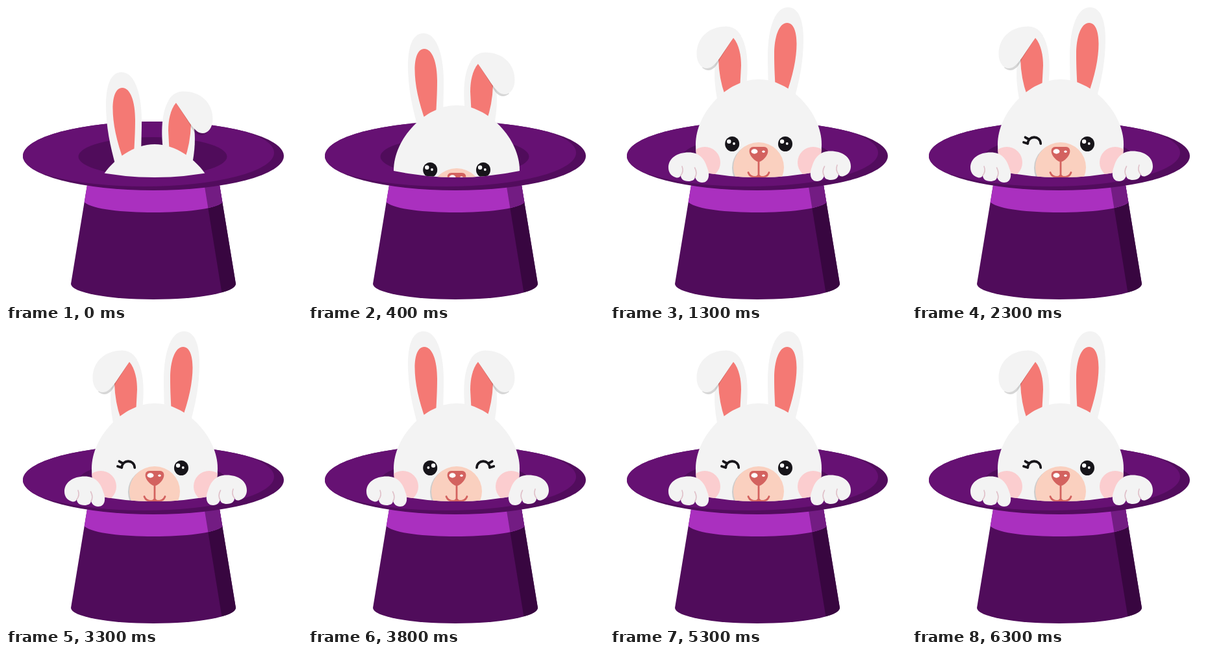
An HTML page for the animation above (6.8 s loop, 456 by 456 pixels).

```html
<!DOCTYPE html>
<html lang="en">
<head>
<meta charset="utf-8">
<title>Rabbit in a hat</title>
<style>
  html, body { margin: 0; width: 100%; height: 100%; overflow: hidden; background: #fff; }
  svg { display: block; width: 100vw; height: 100vh; }
  .fur { fill: #f3f3f3; }
  .inner { fill: #f47974; }
  .shade { fill: #000; fill-opacity: .16; }
  .line { fill: none; stroke-linecap: round; stroke-linejoin: round; }
</style>
</head>
<body>
<svg viewBox="0 0 456 456">
  <defs>
    <clipPath id="body"><path d="M126 270 L100 428 A127 24 0 0 0 354 428 L328 270Z"/></clipPath>
    <clipPath id="brim"><ellipse cx="227" cy="231" rx="201" ry="53"/></clipPath>
    <clipPath id="opening"><path d="M0 0 H456 V254 H326 Q229 274 132 254 H0Z"/></clipPath>
    <path id="skull" d="M132 213 C132 165 180 113 229 113 C278 113 326 165 326 213 C326 240 318 262 308 280 H150 C140 262 132 240 132 213Z"/>
    <clipPath id="face"><use href="#skull"/></clipPath>
    <g id="eye">
      <ellipse cx="188.2" cy="212.5" rx="11" ry="11.5" fill="#17151a"/>
      <circle cx="183.3" cy="208.8" r="3.2" fill="#fff"/>
      <circle cx="191" cy="212" r="1.9" fill="#fff"/>
    </g>
    <g id="paw">
      <path class="fur" d="M90 249 C90 234 104 225.500 121 225.500 C138 225.500 146 236 150 250 C154.500 261 152 272 142 272 C136 272 132 268 131 263 C131 268 126 270 121 270 C113 270 109 266 109 261 C107 265 104 265 101 264 C94 262 90 256 90 249Z"/>
      <path class="line" stroke="#dfbfc8" stroke-width="1.6" d="M111 247 Q114 255 109 261 M130.500 249 Q135 257 131 264"/>
    </g>
  </defs>

  <g clip-path="url(#body)">
    <path fill="#500c5b" d="M90 260 H370 V456 H90Z"/>
    <path fill="#380640" d="M303 260 L333 445 L334 456 H370 V260Z"/>
    <path id="band" fill="#aa30bf" d="M110 260 H345 V303 H333 C310 323 145 323 121.700 303 H110Z"/>
    <path fill="#731c83" d="M303 260 L311.300 311 Q326 308 333 303 H345 V260Z"/>
  </g>
  <g clip-path="url(#brim)">
    <path fill="#520c5d" d="M20 170 H436 V290 H20Z"/>
    <ellipse cx="213" cy="226" rx="200" ry="52" fill="#661173"/>
  </g>
  <ellipse cx="226" cy="232" rx="114.500" ry="30" fill="#500c5b"/>

  <g clip-path="url(#opening)">
    <g id="rabbit">
      <g id="ears">
        <path class="fur" d="M170 150 C160 115 154 85 154 52 C154 25 160 2 178 2 C200 2 210 40 209 85 L208 130Z"/>
        <path class="inner" d="M182 140 C170 108 164.500 80 164.500 58 C164.500 40 169 26 179 26 C192 26 199 48 199 75 C199 95 198 110 197 130Z"/>
        <path class="fur" d="M243 130 C238 95 239 58 254 41 L289 82 Q294 110 286 148Z"/>
        <path class="inner" d="M262 49 C253 60 250 76 250 92 L252 130 L275 137 Q284 112 285 82Z"/>
        <path class="shade" d="M262 49 L283 82 C289 97 299 104 310 95 L290 70Z"/>
        <path class="fur" d="M250 46 C256 35 265 31.500 273 31.500 C300 31.500 318.500 49 318.500 74 C318.500 88 311 96 303 96 C291 96 284 81 262 49Z"/>
      </g>
      <use href="#skull" class="fur"/>
      <g clip-path="url(#face)" fill="#fbcdcf">
        <circle cx="146" cy="241" r="24"/>
        <circle cx="313" cy="241" r="24"/>
      </g>
      <ellipse class="shade" cx="227" cy="249.500" rx="39" ry="38"/>
      <ellipse cx="229" cy="248.500" rx="39" ry="38.500" fill="#fad0bf"/>
      <path class="line" stroke="#d3625f" stroke-width="2.8" d="M229 236 V268 M213 256.500 C216 265 227 265 229 260 C231 265 242 265 245 256.500"/>
      <path fill="#d3625f" d="M221 217 H237 C243 217 245 223 242 229 C239 235 233 240 229 240 C225 240 219 235 216 229 C213 223 215 217 221 217Z"/>
      <ellipse cx="222.500" cy="224" rx="5" ry="3.700" fill="#fff"/>
      <ellipse cx="236.500" cy="224.300" rx="2.200" ry="1.700" fill="#fff"/>
      <g id="eyes">
        <use href="#eye" x="81.800"/>
        <use href="#eye" id="open"/>
        <path id="wink" class="line" stroke="#17151a" stroke-width="3.800" d="M178.300 212 C179 199 197.500 199 198.200 212 M178.300 212 L172 210 M180 205.500 L174.500 202.300"/>
      </g>
    </g>
  </g>
  <use href="#paw" id="left"/>
  <use href="#paw" id="right" transform="translate(461 -2) scale(-1 1)"/>
</svg>
<script>
  const LOOP = 6800, DANCE = 1300, BEAT = 500;
  const part = id => document.getElementById(id);
  const show = (id, on) => part(id).setAttribute("visibility", on ? "visible" : "hidden");
  const move = (id, value) => part(id).setAttribute("transform", value);
  const mirror = (id, on, width) => move(id, on ? `translate(${width} 0) scale(-1 1)` : "");

  function draw(now) {
    const t = now % LOOP;
    const beat = Math.floor((t - DANCE) / BEAT);
    const flipped = beat >= 0 && beat % 2 === 0;
    const winking = beat >= 1;
    const drop = t < 200 ? 100 : t < 400 ? 80 : t < 600 ? 40 : 0;

    move("rabbit", `translate(0 ${drop})`);
    mirror("ears", flipped, 452);
    mirror("eyes", winking && !flipped, 458.2);
    show("open", !winking);
    show("wink", winking);
    show("left", t >= 600);
    show("right", t >= 800);
  }

  const start = performance.now();
  function tick() {
    draw(performance.now() - start);
    requestAnimationFrame(tick);
  }
  tick();
</script>
</body>
</html>
```
